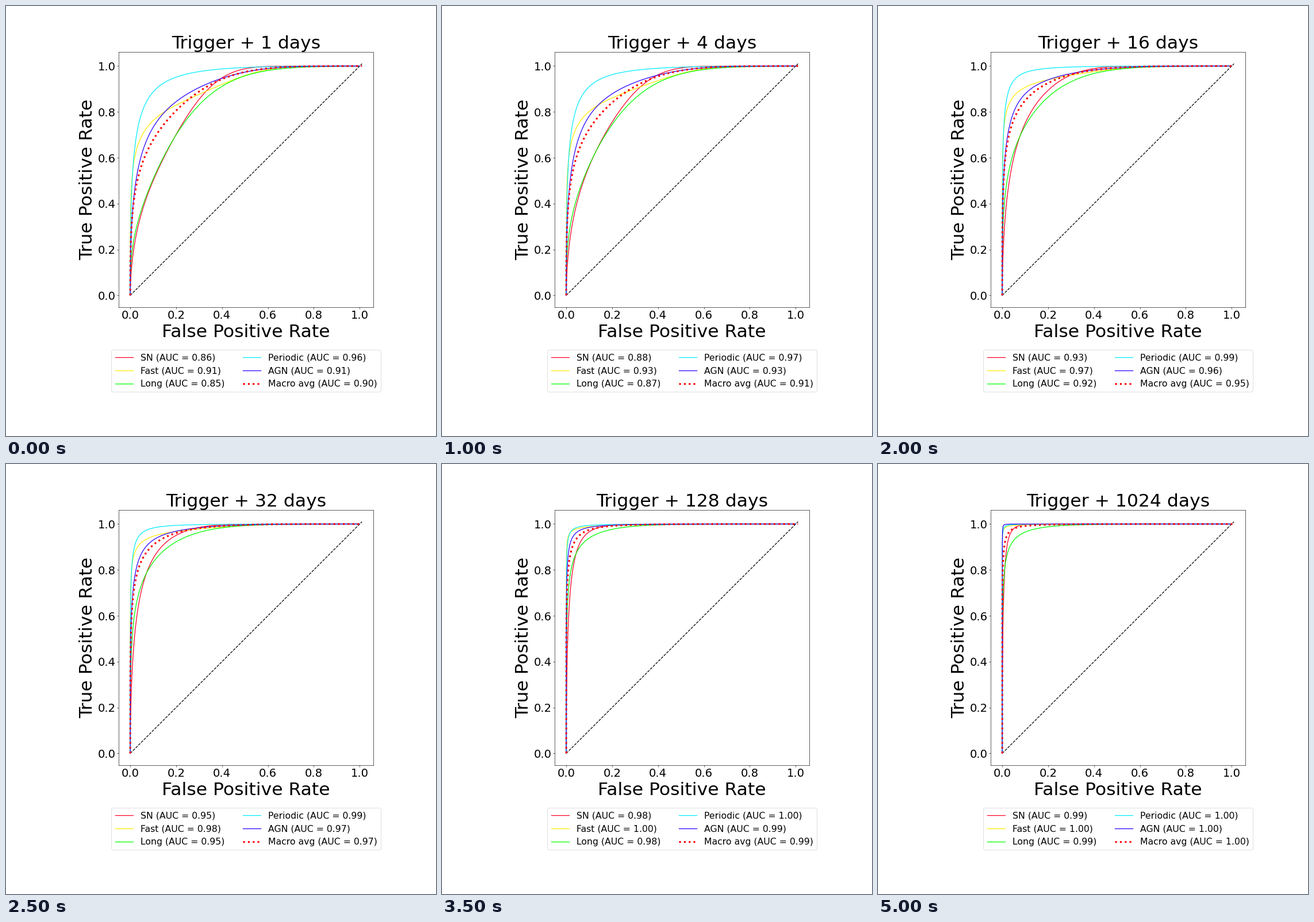
Animation of 748x748 px, one loop 5.5 s. Source, as a matplotlib script:

```python
import numpy as np
import matplotlib.pyplot as plt
from matplotlib.animation import FuncAnimation

SIZE, DPI = 748, 64
PX = 72 / DPI          # one pixel in points
U = 0.786 * PX         # base unit of the layout in points

plt.rcParams.update({
    "font.family": "DejaVu Sans",
    "axes.titlesize": 40 * U,
    "axes.labelsize": 40 * U,
    "axes.linewidth": 0.8 * U,
    "lines.linewidth": 1.6 * U,
    "patch.linewidth": U,
    "legend.fontsize": 20 * U,
})
for axis in ("xtick", "ytick"):
    plt.rcParams.update({
        f"{axis}.labelsize": 25 * U,
        f"{axis}.major.size": 3.5 * U,
        f"{axis}.major.width": 0.8 * U,
        f"{axis}.major.pad": 3.5 * U,
    })

STEPS = 11             # days 1, 2, 4 ... 1024
KEYS = [0, 2, 4, 6, 10]

# Area under the curve at the key steps, then the shape of the curve
# 1 - exp(-(a x^p + b x^q)): p eases from its first to its last value.
CLASSES = {
    "SN": ([0.860, 0.8785, 0.929, 0.977, 0.9925], (0.57, 0.58), 18, 2.7),
    "Fast": ([0.912, 0.927, 0.966, 0.9943, 0.9985], (0.27, 0.15), 11, 3.5),
    "Long": ([0.850, 0.869, 0.9215, 0.976, 0.9865], (0.38, 0.30), 6.5, 1.6),
    "Periodic": ([0.960, 0.967, 0.987, 0.9958, 0.9993], (0.46, 0.20), 4, 3),
    "AGN": ([0.911, 0.927, 0.958, 0.9905, 0.9998], (0.46, 0.26), 7, 3),
}

fpr = np.linspace(0, 1, 500) ** 4


def area(y):
    return np.sum((y[1:] + y[:-1]) / 2 * np.diff(fpr))


def roc(step, auc, p_range, b, q):
    """Curve of the class's shape whose area is its AUC at this step."""
    goal = np.interp(step, KEYS, auc)
    t = step / (STEPS - 1)
    p = p_range[0] + (p_range[1] - p_range[0]) * t * t * (3 - 2 * t)
    low, high = 0.1, 60
    for _ in range(40):
        a = (low + high) / 2
        y = 1 - np.exp(-(a * fpr ** p + b * fpr ** q))
        if area(y) < goal:
            low = a
        else:
            high = a
    return y


def label(name, y):
    return f"{name} (AUC = {area(y):.2f})"


fig = plt.figure(figsize=(SIZE / DPI, SIZE / DPI), dpi=DPI, facecolor="white")
ax = fig.add_axes([196 / SIZE, 224.5 / SIZE, 443.4 / SIZE, 443.2 / SIZE])
ax.set(xlim=(-0.0505, 1.0605), ylim=(-0.0505, 1.0605))
ax.set_xlabel("False Positive Rate", labelpad=5.8 * U)
ax.set_ylabel("True Positive Rate", labelpad=4 * U)
ticks = np.linspace(0, 1, 6)
ax.set_xticks(ticks)
ax.set_yticks(ticks)
title = ax.set_title("", pad=6.5 * PX)

ax.plot([0, 1.01], [0, 1.01], "k--")
names = [*CLASSES, "Macro avg"]
colors = plt.cm.gist_rainbow(np.linspace(0, 1, 6))
lines = [ax.plot([], [], color=col, label=label(name, fpr))[0]
         for name, col in zip(names, colors)]
macro = lines[-1]
macro.set(color="red", linestyle=":", linewidth=4 * U)

legend = ax.legend(handles=lines, ncol=2, loc="upper center",
                   bbox_to_anchor=(417.6 / SIZE, 1 - 598.2 / SIZE),
                   bbox_transform=fig.transFigure, borderaxespad=0)


def update(step):
    title.set_text(f"Trigger + {2 ** step} days")
    curves = [roc(step, *shape) for shape in CLASSES.values()]
    curves.append(np.mean(curves, axis=0))
    for name, line, text, y in zip(names, lines, legend.get_texts(), curves):
        line.set_data(fpr, y)
        text.set_text(label(name, y))
    macro.set_data(np.append(fpr, 1.01), np.append(curves[-1], 1))
    return [title, legend, *lines]


anim = FuncAnimation(fig, update, frames=STEPS, interval=500,
                     repeat=True, repeat_delay=0, blit=False)
plt.show()
```
